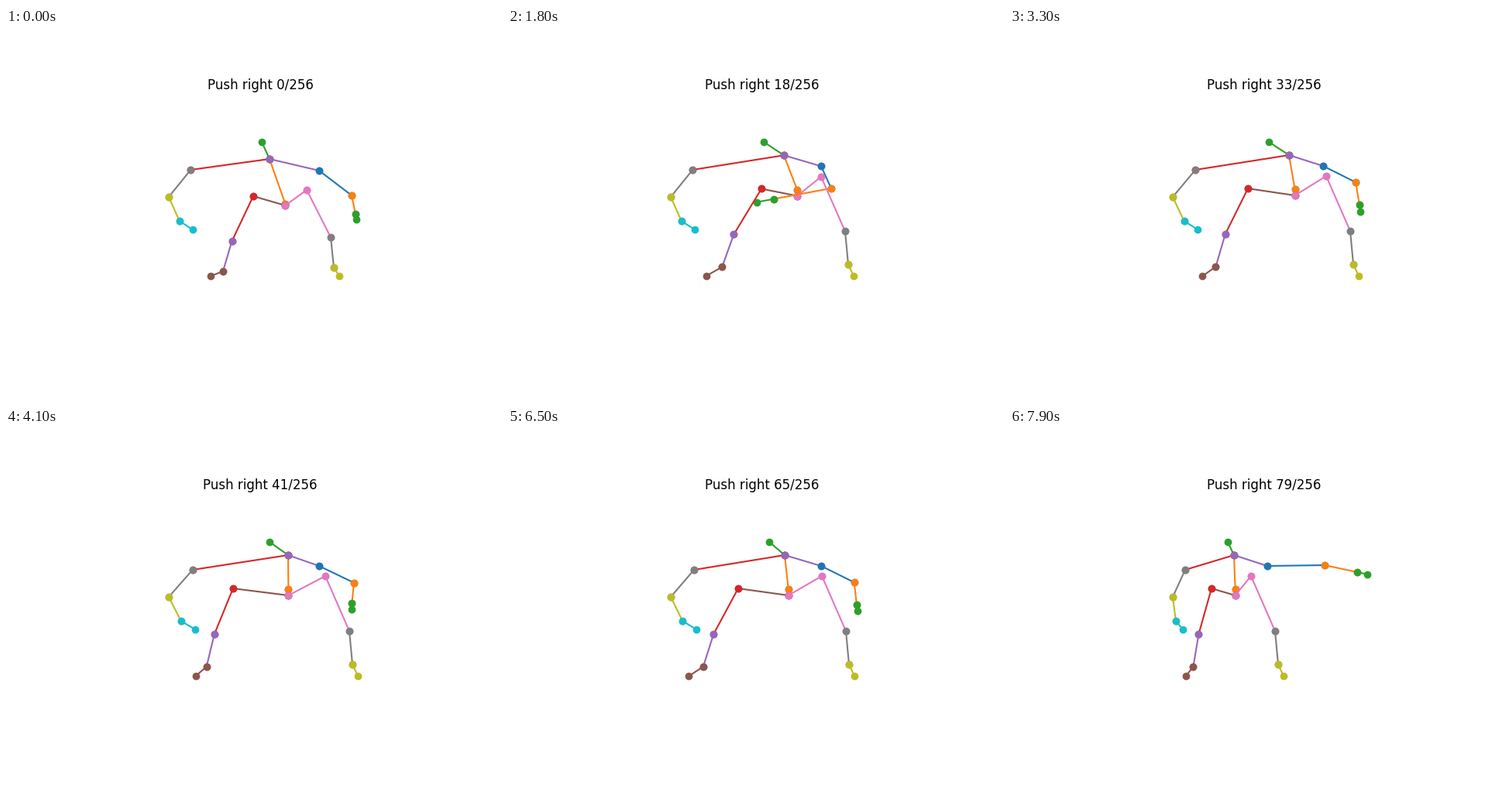
A matplotlib script that plays this animation: 640 by 480 pixels, repeating every 8 s.

```python
import numpy as np
import matplotlib.pyplot as plt
from matplotlib.animation import FuncAnimation

W, H, DPI = 640, 480, 100
FRAMES, INTERVAL, TOTAL = 80, 100, 256
KEYS = np.array([0, 18, 33, 41, 51, 65, 79])
t = np.arange(FRAMES)


def glide(*vals):
    """Smooth curve through values at KEYS, without overshoot."""
    vals = np.array(vals, float)
    step = np.diff(KEYS)
    rate = np.diff(vals) / step
    slope = np.zeros(len(KEYS))
    a, b = rate[:-1], rate[1:]
    same = a * b > 0
    slope[1:-1][same] = 2 * a[same] * b[same] / (a[same] + b[same])
    i = np.clip(np.searchsorted(KEYS, t, side="right") - 1, 0, len(step) - 1)
    h = step[i]
    u = (t - KEYS[i]) / h
    return ((1 + 2 * u) * (1 - u) ** 2 * vals[i] + u * (1 - u) ** 2 * h * slope[i]
            + u * u * (3 - 2 * u) * vals[i + 1] + u * u * (u - 1) * h * slope[i + 1])


def pulse(center, width):
    return np.exp(-((t - center) / width) ** 2)


def joint(x, y, drop=0):
    """Joint path; drop is how far it sinks while crouched."""
    return np.stack([x + 0 * t, y + drop * crouch], axis=1)


def mix(a, b, k):
    return a + (b - a) * k


# Body movements: an opening crouch, two pushes, a final turn
crouch = np.exp(-t / 6)
push, swipe = pulse(18, 5), pulse(51, 8)
u = np.clip((t - 65) / 14, 0, 1)
turn = u * u * (3 - 2 * u)

neck_x = glide(340, 356, 360, 364, 340, 357, 289)
head_x = glide(330, 330, 334, 340, 317, 337, 281)
l_hip_x = glide(319, 327, 307, 293, 285, 297, 260)
r_hip_x = neck_x + 48 - 26 * turn
hips_x = mix(l_hip_x, r_hip_x, 0.6)
l_foot_x = 264 - 0.47 * t
sway = head_x - 281

# Trunk
hips = joint(hips_x, 216, 13)
spine = joint(hips_x, 208, 19)
neck = joint(neck_x, 164, 5)
head = joint(head_x, 147)

# Left arm
l_shoulder = joint(226 + 0.25 * sway, 183)
l_elbow = joint(210, 218)
l_wrist = joint(214 + 0.2 * sway, 249)
l_hand = joint(223 + 0.36 * sway, 260)

# Right arm
r_shoulder = joint(404 - 72 * turn, 178, 6)
r_elbow = joint(446 - 29 * push + 14 * swipe - 40 * turn,
                199 + 7 * push + 3 * swipe - 22 * turn, 17)
r_wrist = joint(451 - 108 * push - 22 * swipe - 3 * turn,
                228 - 8 * push - 10 * swipe - 42 * turn, 12)
r_hand = mix(r_elbow, r_wrist, 1.3)

# Legs
l_hip = joint(l_hip_x, 207, 10)
l_knee = joint(mix(l_foot_x, l_hip_x, 0.5), 266, 9)
l_ankle = joint(mix(l_foot_x, l_hip_x, 0.29), 308, 6)
l_foot = joint(l_foot_x, 320)
r_hip = joint(r_hip_x, 191, 18)
r_knee = joint(r_hip_x + 31, 262, 8)
r_ankle = joint(r_hip_x + 35, 305, 4)
r_foot = joint(r_hip_x + 42, 320)

chains = [
    (hips, spine, neck, head),
    (neck, l_shoulder), (neck, r_shoulder),
    (hips, l_hip), (hips, r_hip),
    (l_shoulder, l_elbow, l_wrist, l_hand),
    (r_shoulder, r_elbow, r_wrist, r_hand),
    (l_hip, l_knee, l_ankle, l_foot),
    (r_hip, r_knee, r_ankle, r_foot),
]
bones = [pair for chain in chains for pair in zip(chain, chain[1:])]

fig = plt.figure(figsize=(W / DPI, H / DPI), dpi=DPI, facecolor="white")
ax = fig.add_axes([0, 0, 1, 1])
ax.set(xlim=(0, W), ylim=(H, 0))
ax.axis("off")

lines = [ax.plot([], [], "o-", color=f"C{k % 10}", lw=1.5, ms=6)[0]
         for k in range(len(bones))]
title = fig.text(328 / W, 401.23 / H, "", ha="center", va="baseline",
                 fontsize=12, family="DejaVu Sans")


def update(n):
    for line, (a, b) in zip(lines, bones):
        line.set_data([a[n, 0], b[n, 0]], [a[n, 1], b[n, 1]])
    title.set_text(f"Push right {n}/{TOTAL}")
    return [*lines, title]


anim = FuncAnimation(fig, update, frames=FRAMES, interval=INTERVAL,
                     repeat=True, repeat_delay=0, blit=False)
plt.show()
```
